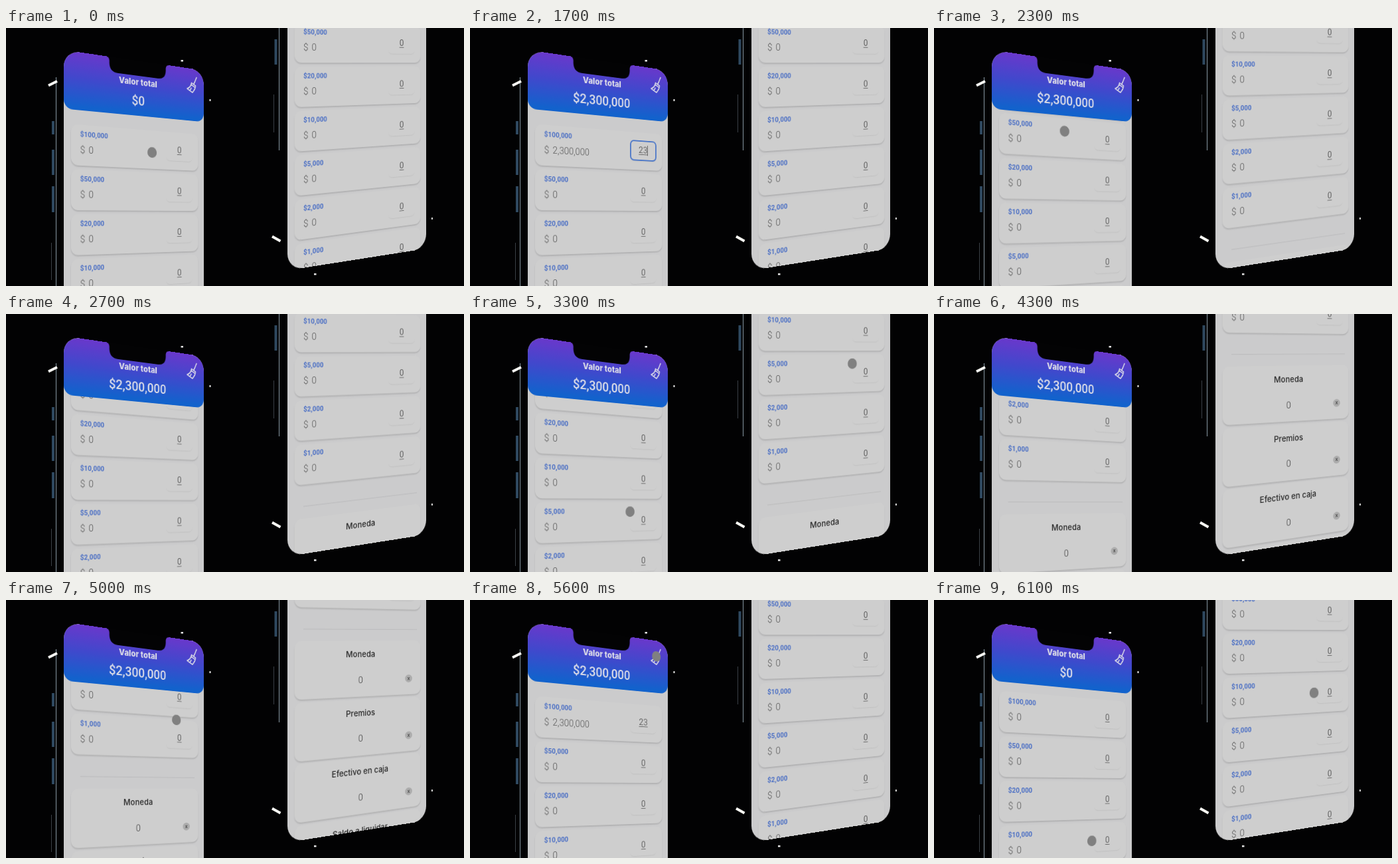
An HTML page that plays this animation: 690 px wide and 388 px high, repeating every 6.2 s.

```html
<!DOCTYPE html>
<html lang="es">
<head>
<meta charset="utf-8">
<title>Valor total</title>
<style>
html, body { margin: 0; width: 100%; height: 100%; overflow: hidden; background: #020203; }
#stage { position: relative; width: 690px; height: 388px; overflow: hidden; background: #020203; filter: blur(.3px); }
#stage > svg { position: absolute; left: 0; top: 0; }
.screen {
  position: absolute; left: 0; top: 0; width: 240px; height: 556px;
  border-radius: 25px; overflow: hidden; background: #cbcbcc;
  transform-origin: 0 0; font: 14px/1 Roboto, sans-serif; white-space: pre;
}
.screen div, .screen span { position: absolute; box-sizing: border-box; }
.mid { transform: translateY(-50%); }
.list { left: 0; top: 0; width: 240px; }
.card {
  left: 11px; width: 218px; height: 62px; border-radius: 11px;
  background: #cecece; box-shadow: 0 2px 2px rgba(0, 0, 0, .13);
}
.label { left: 14px; top: 15px; font-size: 10.4px; font-weight: 700; color: #4b6fc4; }
.amount { left: 14px; top: 38px; font-weight: 300; word-spacing: 2px; color: #555; }
.field {
  left: 158px; top: 13px; width: 49px; height: 34px; border-radius: 7px;
  border: 2px solid transparent; box-shadow: 0 2px 2px -1px rgba(0, 0, 0, .07);
  font-size: 14.5px; line-height: 30px; text-align: center; color: #666;
}
.field u { text-decoration-thickness: 1px; text-underline-offset: 2px; }
.field.focus { border-color: #4a76c8; }
.field.focus u { border-right: 1px solid #555; }
.sum { height: 90px; text-align: center; }
.sum span { left: 0; width: 100%; }
.name { top: 22px; font: 500 13px/1 Inter, sans-serif; color: #262626; }
.value { top: 63.5px; font-size: 15px; font-weight: 300; color: #444; }
.clear {
  left: 189px; top: 57px; width: 13px; height: 13px; border-radius: 50%;
  background: #acacac; font: 600 8px/13px Inter, sans-serif; color: #444;
}
.rule { left: 25px; top: 613px; width: 197px; height: 1px; background: #bababb; }
.head {
  left: 0; top: 0; width: 240px; height: 88px; border-radius: 0 0 14px 14px;
  background: linear-gradient(#6938cb, #4148cc 45%, #1262cc 95%);
  text-align: center; color: #dedee8;
}
.head span { left: 0; width: 100%; }
.title { top: 33.5px; font: 800 13px/1 Inter, sans-serif; }
.total { top: 65px; font-size: 19.8px; font-weight: 500; }
.head svg { position: absolute; left: 0; top: 0; }
.finger {
  left: -8px; top: -8px; width: 16px; height: 17px; border-radius: 50%;
  background: #808080; box-shadow: 0 0 1px #909090;
}
</style>
</head>
<body>
<div id="stage">
  <svg width="690" height="388" fill="none">
    <path d="M75.5 74V388M411.5 0V184" stroke="#8797a3"/>
    <path d="M71 140v20M71 183v38M71 238v39M406.500 17v38" stroke="#2f4960" stroke-width="4"/>
    <path d="M68.500 323v56M403.500 100v57" stroke="#3a3f45"/>
    <path d="M64 86.500L77 80M401 313.500L413.500 320.500" stroke="#f6f6f2" stroke-width="4"/>
    <g fill="#e4e4e4">
      <rect x="263.500" y="48" width="3.500" height="2.500"/>
      <rect x="306.500" y="107" width="2" height="3"/>
      <rect x="464" y="369" width="3.500" height="2.500"/>
      <rect x="641" y="285" width="1.800" height="3"/>
    </g>
  </svg>
</div>
<script>
const LOOP = 6200, STEP = 100, GLIDE = 120;
const FOCUS = [300, 2400], TYPING = 700, KEY = 300, CLEAR = 5700;
const notes = [100, 50, 20, 10, 5, 2, 1];
const sums = ['Moneda', 'Premios', 'Efectivo en caja', 'Saldo a liquidar'];

// taps (dy = 0) and swipes on the screen plane
const touches = [
  { start: 0, dur: 200, x: 144, y: 145, dy: 0 },
  { start: 1900, dur: 500, x: 117, y: 198, dy: -107 },
  { start: 3300, dur: 300, x: 169, y: 264, dy: -56 },
  { start: 3800, dur: 400, x: 115, y: 283, dy: -135 },
  { start: 5000, dur: 300, x: 188, y: 135, dy: 290 },
  { start: 5600, dur: 100, x: 218, y: 26, dy: 0 },
  { start: 6000, dur: 100, x: 165, y: 343, dy: -8 }
];

const money = n => n.toLocaleString('en-US');

// Distance a swipe has scrolled: it follows the finger, then glides to a stop.
function swiped({ dur, dy }, age) {
  if (age <= dur) return dy * age / dur;
  return dy + dy / dur * GLIDE * (1 - Math.exp((dur - age) / GLIDE));
}

function scrollAt(t) {
  let offset = 0;
  touches.forEach((touch, i) => {
    if (t <= touch.start) return;
    const stop = i + 1 < touches.length ? touches[i + 1].start : LOOP;
    offset = Math.max(0, offset - swiped(touch, Math.min(t, stop) - touch.start));
  });
  return offset;
}

const noteCard = (n, i) => `<div class="card" style="top:${109.6 + 68 * i}px">
  <span class="label mid">$${money(n * 1000)}</span><span class="amount mid">$ 0</span>
  <div class="field"><u>0</u></div></div>`;

const sumCard = (name, i) => `<div class="card sum" style="top:${632 + 94.7 * i}px">
  <span class="name mid">${name}</span><span class="value mid">0</span>
  <div class="clear">x</div></div>`;

const screenHtml = `
  <div class="list">${notes.map(noteCard).join('')}<div class="rule"></div>${sums.map(sumCard).join('')}</div>
  <div class="head">
    <svg width="240" height="88" fill="none">
      <path d="M66 0Q71 0 71.500 6V10Q72 24 86 24H154Q168 24 168.500 10V6Q169 0 174 0Z" fill="#030304"/>
      <g transform="translate(207 13)" stroke="#dedee8" stroke-width="1.800" stroke-linecap="round" stroke-linejoin="round">
        <path d="M19 1L14 12M9.500 11L17 15C16.500 20 14 24 11 27L1 21.500C5 20 8.500 16 9.500 11ZM8.500 14L16 18M6 24L9 20"/>
      </g>
    </svg>
    <span class="title mid">Valor total</span><span class="total mid">$0</span>
  </div>
  <div class="finger"></div>`;

// Vertical edges stay vertical; rows are level at y = horizon, plane height v0.
function addScreen({ x, horizon, v0, sx, sy, far }) {
  const el = document.createElement('div');
  const k = (far - 1) / 240;
  el.className = 'screen';
  el.innerHTML = screenHtml;
  el.style.transform = `matrix3d(${[
    x * k + sx, horizon * k, 0, k,
    0, sy, 0, 0,
    0, 0, 1, 0,
    x, horizon - sy * v0, 0, 1
  ]})`;
  document.getElementById('stage').append(el);
  const get = s => el.querySelector(s);
  return {
    list: get('.list'), amount: get('.amount'), field: get('.field'),
    digits: get('.field u'), total: get('.total'), finger: get('.finger')
  };
}

const screens = [
  addScreen({ x: 87, horizon: 284, v0: 250, sx: 1.002, sy: 1.004, far: 1.14 }),
  addScreen({ x: 424, horizon: 52, v0: 239.7, sx: .973, sy: .988, far: 1.117 })
];

function render(t) {
  const offset = scrollAt(t);
  const touch = touches.find(p => t >= p.start && t <= p.start + p.dur);
  const keys = Math.max(0, Math.floor((t - TYPING) / KEY));
  const count = t < CLEAR ? Number('23'.slice(0, keys)) : 0;
  const value = money(count * 100000);
  const focused = t >= FOCUS[0] && t < FOCUS[1];
  for (const s of screens) {
    s.list.style.transform = `translateY(${-offset}px)`;
    s.amount.textContent = '$ ' + value;
    s.total.textContent = '$' + value;
    s.digits.textContent = count;
    s.field.classList.toggle('focus', focused);
    s.finger.style.visibility = touch ? 'visible' : 'hidden';
    if (touch) {
      const y = touch.y + swiped(touch, t - touch.start);
      s.finger.style.transform = `translate(${touch.x}px, ${y}px)`;
    }
  }
}

let start = null, shown = -1;
function tick(now) {
  if (start === null) start = now;
  const t = Math.floor((now - start) % LOOP / STEP) * STEP;
  if (t !== shown) render(shown = t);
  requestAnimationFrame(tick);
}
render(0);
requestAnimationFrame(tick);
</script>
</body>
</html>
```
